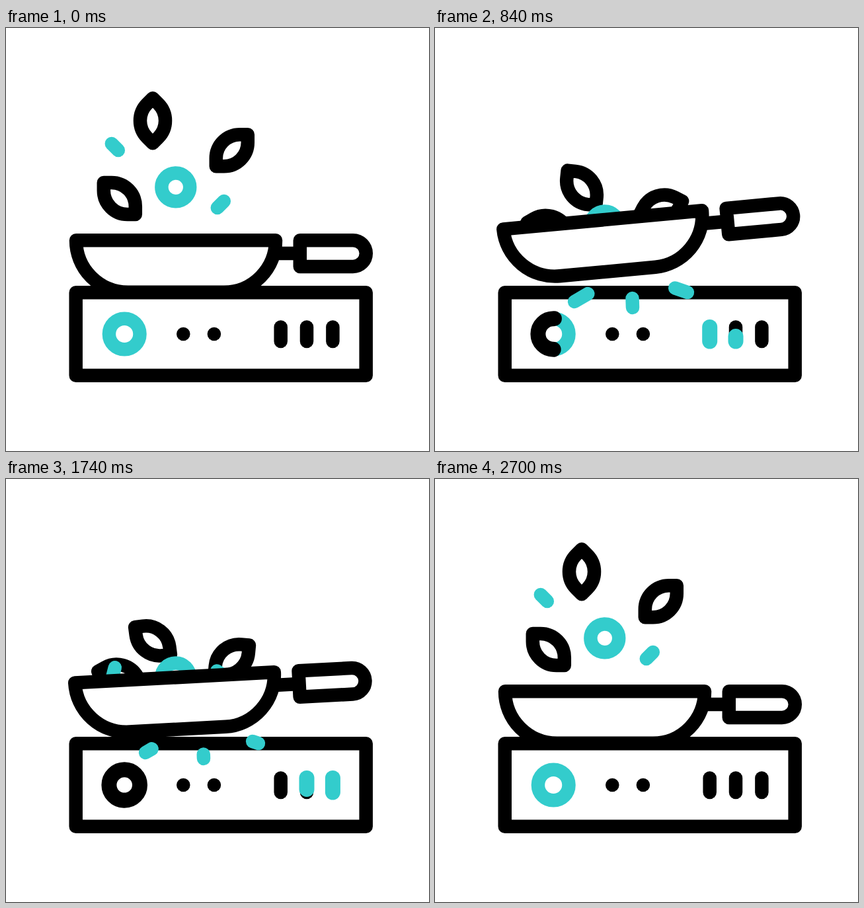
An HTML page that plays this animation: 640 px wide and 640 px high, repeating every 3.08 s.

```html
<!DOCTYPE html>
<html lang="en">
<head>
<meta charset="utf-8">
<title>Cooking</title>
<style>
@property --head { syntax: "<length>"; inherits: false; initial-value: -2px; }
@property --tail { syntax: "<length>"; inherits: false; initial-value: -2px; }

html, body { margin: 0; width: 100%; height: 100%; overflow: hidden; background: #fff; }
svg {
  display: block; width: 100vw; height: 100vh;
  fill: none; stroke: #000; stroke-width: 20.5;
  stroke-linecap: round; stroke-linejoin: round;
}
.teal { stroke: #3cc; }
.solid { fill: #fff; }
.dots { fill: #000; stroke: none; }

.pan, .food, .trim, .spark {
  animation: 3080ms cubic-bezier(.33, 0, .67, 1) infinite both;
}

.pan { transform-origin: 325px 360.5px; animation-name: bob, tilt; }
@keyframes bob {
  0%, 7.14% { translate: 0 0; }
  25.3% { translate: 0 -38px; }
  47.4% { translate: 0 -14px; }
  67.53% { translate: 0 -38.8px; }
  87.66%, 100% { translate: 0 0; }
}
@keyframes tilt {
  0%, 10.39% { rotate: 0deg; }
  29.22% { rotate: -5.5deg; }
  43.18% { rotate: 3.9deg; }
  57.14% { rotate: -3.1deg; }
  67.53% { rotate: 4.3deg; }
  87.66%, 100% { rotate: 0deg; }
}

/* --low and --high: drop and apex offsets; --r1..--r3: turns at drop, apex, second drop */
.food { animation-name: toss, spin; }
@keyframes toss {
  0%, 7.6% { translate: 0 0; }
  31.82% { translate: 0 var(--low); }
  41.56% { translate: var(--drift, 0px) var(--high); }
  59.42% { translate: 0 var(--mid, var(--low)); }
  67.53% { translate: 0 var(--low); }
  87.66%, 100% { translate: 0 0; }
}
@keyframes spin {
  0%, 7.6% { rotate: 0deg; }
  31.82% { rotate: var(--r1, 0deg); }
  41.56% { rotate: var(--r2, 0deg); }
  63.64%, 67.53% { rotate: var(--r3, 0deg); }
  87.66%, 100% { rotate: 0deg; }
}
.leaf1 { --low: 112px; --high: 7px; --r1: -43deg; --r2: -109deg; --r3: -34deg; }
.leaf2 { --low: 96px; --high: -17.5px; --r1: 30deg; --r2: -64deg; --r3: 28deg; }
.leaf3 { --low: 50px; --high: -59px; --r1: -33deg; --r2: -19deg; --r3: -33deg; }
.ring { --low: 64px; --high: -4px; }
.bit1 { --low: 144px; --mid: 117px; --high: 48px; --drift: -25px; --r1: 130deg; --r2: -19deg; --r3: 85deg; }
.bit2 { --low: 34px; --high: -54px; --r1: 110deg; --r2: -4deg; --r3: 110deg; }

.trim { stroke-width: 23; stroke-dasharray: 100 200; }
.dial { animation-name: dial; }
@keyframes dial {
  0%, 7.14% { stroke-dashoffset: 101; }
  46.75%, 55.19% { stroke-dashoffset: 0; }
  87.66%, 100% { stroke-dashoffset: -101; }
}
.bar { animation-name: bar; animation-delay: calc(var(--i) * 258ms); }
@keyframes bar {
  0%, 15.55% { stroke-dashoffset: 102; }
  23.93%, 45.68% { stroke-dashoffset: 0; }
  54.06%, 100% { stroke-dashoffset: -102; }
}

.spark {
  stroke-dasharray: calc(var(--head) - var(--tail)) 200px;
  stroke-dashoffset: calc(-1 * var(--tail));
  animation-name: head, tail;
}
@keyframes head {
  0%, 15.06% { --head: -2px; }
  24.8%, 38% { --head: 102px; }
  38.01%, 42.3% { --head: -2px; }
  52.05%, 100% { --head: 102px; }
}
@keyframes tail {
  0%, 21.6% { --tail: -2px; }
  32.95%, 38% { --tail: 102px; }
  38.01%, 48.8% { --tail: -2px; }
  60.2%, 100% { --tail: 102px; }
}
</style>
</head>
<body>
<svg viewBox="0 0 640 640">
  <defs>
    <path id="leaf" d="M24-24H12A36 36 0 0 0-24 12V24H-12A36 36 0 0 0 24-12Z"/>
    <path id="bit" d="M-5-5L5 5"/>
    <path id="slot" d="M0 474V452.5"/>
  </defs>

  <rect class="solid" x="105.7" y="400.3" width="439" height="125.5"/>
  <circle class="teal" cx="179.2" cy="463" r="23.3"/>
  <path class="trim dial" pathLength="100" d="M179.2 486.3a23.3 23.3 0 0 1 0-46.6a23.3 23.3 0 0 1 0 46.6"/>
  <g class="dots">
    <circle cx="268.3" cy="463" r="10.3"/>
    <circle cx="314.9" cy="463" r="10.3"/>
  </g>
  <g>
    <use href="#slot" x="415.7"/>
    <use href="#slot" x="455"/>
    <use href="#slot" x="494.4"/>
  </g>
  <g class="teal">
    <path class="trim bar" style="--i:0" pathLength="100" d="M415.7 474V452.5"/>
    <path class="trim bar" style="--i:1" pathLength="100" d="M455 474V452.5"/>
    <path class="trim bar" style="--i:2" pathLength="100" d="M494.4 474V452.5"/>
  </g>

  <g transform="translate(222 140.3)"><g class="food leaf1"><use href="#leaf" transform="rotate(-45)"/></g></g>
  <g transform="translate(341.8 185.2)"><g class="food leaf2"><use href="#leaf"/></g></g>
  <g transform="translate(171.8 258)"><g class="food leaf3"><use href="#leaf" transform="rotate(-90)"/></g></g>
  <g class="teal">
    <g transform="translate(256.8 240.8)"><circle class="food ring" r="21.4"/></g>
    <g transform="translate(164.8 180)"><g class="food bit1"><use href="#bit"/></g></g>
    <g transform="translate(324.8 267)"><g class="food bit2"><use href="#bit" transform="rotate(-90)"/></g></g>
  </g>

  <g class="pan">
    <path d="M412 341H440"/>
    <path class="solid" d="M106 321.3H408A78.5 78.5 0 0 1 330 399.8H184.5A78.5 78.5 0 0 1 106 321.3Z"/>
    <path class="solid" d="M444.8 321.3H525a19.8 19.8 0 0 1 0 39.6H444.8Z"/>
  </g>

  <g class="teal">
    <path class="spark" pathLength="100" d="M252 390L211 414"/>
    <path class="spark" pathLength="100" d="M298 395L299 423"/>
    <path class="spark" pathLength="100" d="M344 387L382 400"/>
  </g>
</svg>
</body>
</html>
```
